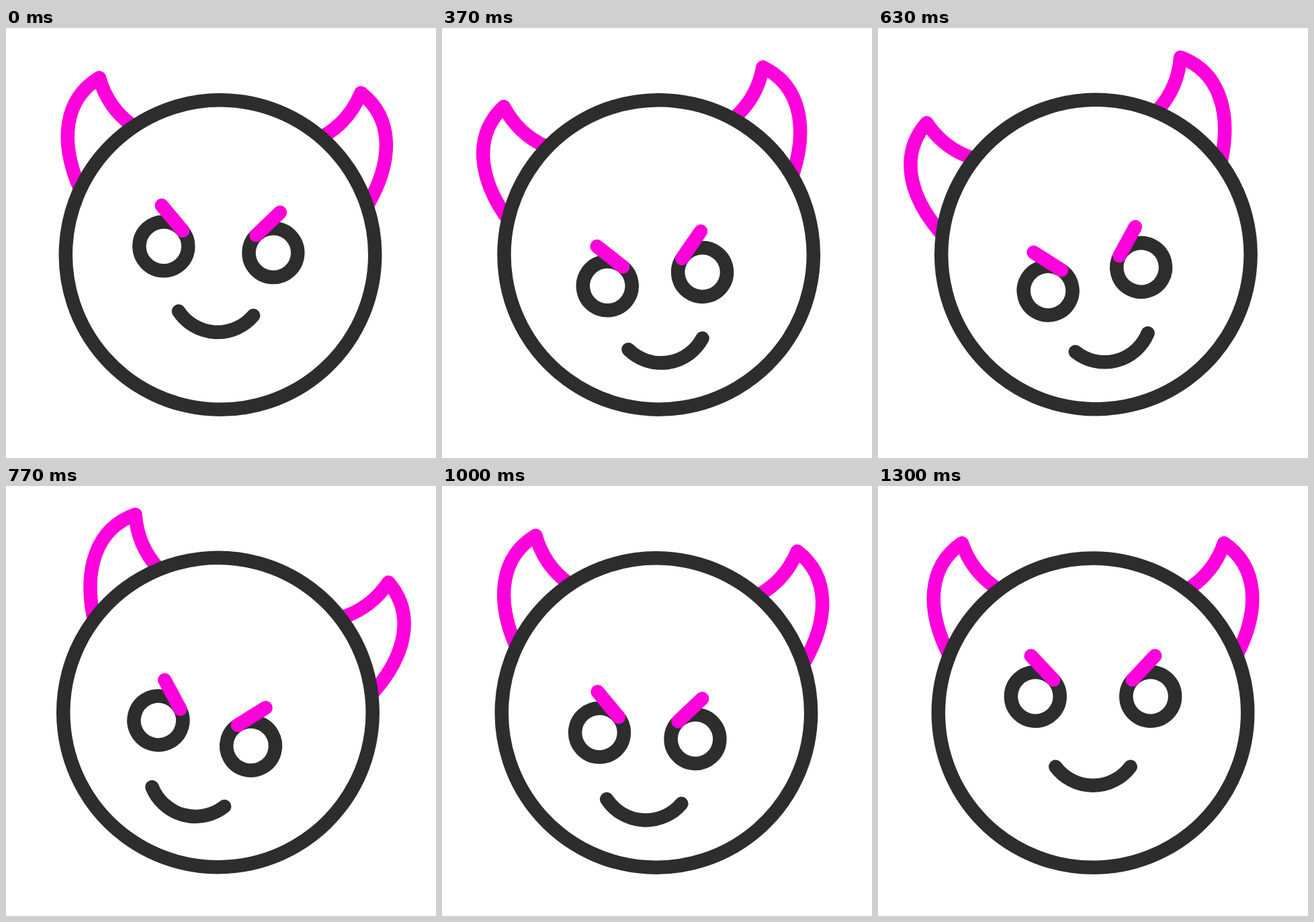
These frames come from a looping animation (640 by 640 pixels, 1670 ms). An HTML page:

```html
<!DOCTYPE html>
<html>
<head>
<meta charset="utf-8">
<style>
  html, body { margin: 0; width: 100%; height: 100%; overflow: hidden; background: #fff; }
  svg { display: block; width: 100%; height: 100%; }
  .ink, .pink { fill: none; stroke-width: 20.5; stroke-linecap: round; stroke-linejoin: round; }
  .ink { stroke: #2d2d2d; }
  .pink { stroke: #ff00dc; }
</style>
</head>
<body>
<svg viewBox="0 0 640 640">
  <defs>
    <path id="horn" class="pink" d="M104 248C72 183 74 120 125 85C134 111 150 135 178 153"/>
    <g id="eye">
      <circle class="ink" cx="234.3" cy="313.3" r="36.4"/>
      <path class="pink" d="M227.7 252.7L261.3 288.5"/>
    </g>
  </defs>
  <g id="devil">
    <use href="#horn"/>
    <use href="#horn" transform="matrix(-1 0 0 1 640 0)"/>
    <circle class="ink" cx="320" cy="337.6" r="230.2" style="fill:#fff"/>
    <use id="left" href="#eye"/>
    <use id="right" href="#eye"/>
    <path id="mouth" class="ink" d="M264.3 417.8A69.5 69.5 0 0 0 375.7 417.8"/>
  </g>
</svg>
<script>
  const LOOP = 1670, STEP = LOOP / 50;

  // Tracks are [step, value] keys, eased in and out between neighbours.
  const TILT = [[-1.45, 0], [6.75, 40], [12.5, -18.5], [15.9, 18.5], [19.8, -18.5],
                [23.75, 18.5], [27.75, -18.5], [31.75, 18.5], [38.8, 0]];
  const EYES = [[-1.4, 0], [2.6, 1], [31.75, 1], [38.6, 0]];
  const MOUTH = [[-1.4, 0], [4.6, 1], [31.75, 1], [38.6, 0]];

  const $ = id => document.getElementById(id);
  const place = (id, transform) => $(id).setAttribute('transform', transform);

  function sample(track, step) {
    const next = track.findIndex(key => key[0] > step);
    if (next < 0) return track[track.length - 1][1];
    const [t0, v0] = track[next - 1], [t1, v1] = track[next];
    const u = (step - t0) / (t1 - t0);
    return v0 + (v1 - v0) * u * u * (3 - 2 * u);
  }

  function draw() {
    const time = performance.now() % LOOP;
    const step = Math.min(49, Math.floor((time + 6) / STEP));
    const eyes = sample(EYES, step), mouth = sample(MOUTH, step);
    place('devil', `rotate(${sample(TILT, step)} 320 320)`);
    place('left', `translate(${3.2 * eyes} ${58.8 * eyes})`);
    place('right', `matrix(-1 0 0 1 ${640 - 25.4 * eyes} ${59.8 * eyes})`);
    place('mouth', `translate(${-10.2 * mouth} ${52.5 * mouth})`);
    requestAnimationFrame(draw);
  }
  draw();
</script>
</body>
</html>
```
